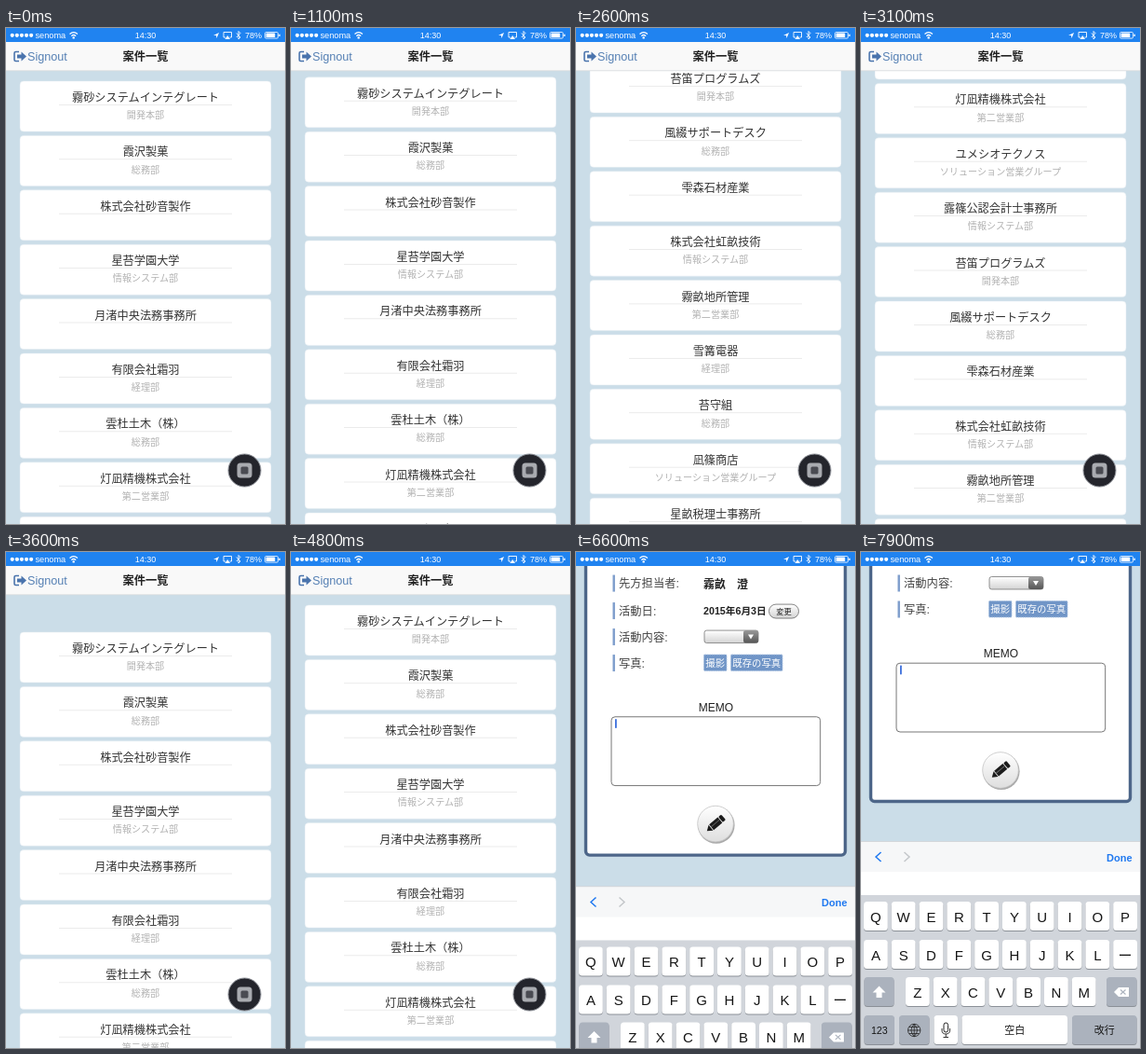
An HTML page that plays this animation: 300x532 px, repeating every 8 s.

```html
<!DOCTYPE html>
<html lang="ja">
<head>
<meta charset="utf-8">
<style>
html, body { margin: 0; width: 100%; height: 100%; overflow: hidden; background: #cbdde8; }
svg { display: block; width: 100vw; height: 100vh; font-family: "Liberation Sans", "Noto Sans CJK JP", "Noto Sans CJK", sans-serif; }
</style>
</head>
<body>
<svg id="stage" viewBox="0 0 300 532">
  <defs>
    <linearGradient id="pill" x2="0" y2="1"><stop stop-color="#fff"/><stop offset="1" stop-color="#d4d4d4"/></linearGradient>
    <linearGradient id="arrow" x2="0" y2="1"><stop stop-color="#999"/><stop offset="1" stop-color="#555"/></linearGradient>
    <linearGradient id="disc" x2="0" y2="1"><stop stop-color="#fff"/><stop offset="1" stop-color="#dedede"/></linearGradient>
  </defs>
  <rect width="300" height="532" fill="#cbdde8"/>
  <g id="listPage"><g id="cards"></g><g id="listTop"></g></g>
  <g id="formPage"></g>
  <g id="keyboard"></g>
  <g id="status"></g>
</svg>
<script>
const LOOP = 8000;
const $ = id => document.getElementById(id);
const rect = (x, y, w, h, fill, r = 0, more = '') =>
  `<rect x="${x}" y="${y}" width="${w}" height="${h}" rx="${r}" fill="${fill}" ${more}/>`;
const path = (d, stroke, width = 1, more = 'fill="none"') =>
  `<path d="${d}" stroke="${stroke}" stroke-width="${width}" ${more}/>`;
// y is the vertical middle of the glyphs
const text = (x, y, size, str, fill = '#333', more = '') =>
  `<text x="${x}" y="${y + size * .37}" font-size="${size}" fill="${fill}" ${more}>${str}</text>`;
const MID = 'text-anchor="middle"', BOLD = 'font-weight="bold"';

const clients = `霧砂システムインテグレート,開発本部
霞沢製菓,総務部
株式会社砂音製作,
星苔学園大学,情報システム部
月渚中央法務事務所,
有限会社霜羽,経理部
雲杜土木（株）,総務部
灯凪精機株式会社,第二営業部
ユメシオテクノス,ソリューション営業グループ
露篠公認会計士事務所,情報システム部
苔笛プログラムズ,開発本部
風綴サポートデスク,総務部
雫森石材産業,
株式会社虹畝技術,情報システム部
霧畝地所管理,第二営業部
雪篝電器,経理部
苔守組,総務部
凪篠商店,ソリューション営業グループ
星畝税理士事務所,経理部
雨笛物産,総務部`.split('\n').map(line => line.split(','));

const card = ([name, dept], i) => `<g transform="translate(0 ${i * 58.4})">` +
  rect(15, 57, 270, 54, '#fff', 4, 'stroke="#e3ebf0" stroke-width=".5"') +
  text(150, 74.5, 12.2, name, '#333', MID) +
  rect(57, 82, 186, .8, '#e6e6e6') +
  text(150, 93.5, 10.1, dept, '#b2b2b2', MID) + '</g>';

const header = (title, left) =>
  rect(0, 14, 300, 32, '#f9f9f9') + rect(0, 45.5, 300, .7, '#cfd4d8') +
  text(150, 30.5, 12.3, title, '#222', MID + ' ' + BOLD) + left;

const signout =
  path('M14 25.5H10.5Q9 25.5 9 27V34Q9 35.5 10.5 35.5H14', '#4a74ad', 1.6) +
  path('M12 28.5H16.5V25.5L22 30.5L16.5 35.5V32.5H12Z', 'none', 0, 'fill="#4a74ad"') +
  text(23, 30.5, 12.6, 'Signout', '#5680b4');

const stopButton =
  '<circle cx="256.5" cy="474.5" r="17.5" fill="#24252c" stroke="#8d9097" stroke-width="1"/>' +
  rect(248.5, 466.5, 16, 16, '#a9abb0', 3.5) + rect(252.5, 470.5, 8, 8, '#4a4b52', 1.5);

const fields = [['先方担当者:', 114], ['活動日:', 143.5], ['活動内容:', 171.5], ['写真:', 199.5]];
const blueButton = (x, w, label) =>
  rect(x, 190.5, w, 17.5, '#7095c7', 1, 'stroke="#a9c0df" stroke-dasharray="1.5 1"') +
  text(x + w / 2, 199.5, 10.4, label, '#fff', MID);

const form =
  rect(10.5, 57, 279, 348.5, '#fff', 4, 'stroke="#4d6689" stroke-width="3.4"') +
  text(150, 82, 12.2, clients[0][0], '#333', MID) +
  fields.map(([label, y]) => rect(39.5, y - 9, 2.4, 18, '#7c9ccb') + text(46, y, 12.3, label, '#444')).join('') +
  text(137, 114.5, 12, '霧畝　澄', '#222', BOLD) +
  text(137, 143.5, 10.7, '2015年6月3日', '#222', BOLD) +
  rect(207.5, 136.5, 32, 15, 'url(#pill)', 7.5, 'stroke="#666" stroke-width=".8"') +
  text(223.5, 144, 8.3, '変更', '#222', MID) +
  rect(138, 164.5, 58, 13.5, 'url(#pill)', 2.5, 'stroke="#777" stroke-width=".8"') +
  rect(180, 164.5, 16, 13.5, 'url(#arrow)', 2.5) +
  path('M185 169H191L188 174Z', 'none', 0, 'fill="#fff"') +
  blueButton(137.5, 24.5, '撮影') + blueButton(166.5, 55.5, '既存の写真') +
  text(150.5, 247, 12, 'MEMO', '#222', MID) +
  rect(38, 257.2, 224.7, 73.8, '#fff', 4, 'stroke="#777" stroke-width="1"') +
  rect(42, 259.5, 1.8, 10, '#3c6fdc', .8, 'id="caret"') +
  '<circle cx="150.8" cy="373.3" r="19.8" fill="#aaa"/>' +
  '<circle cx="150" cy="372" r="19.3" fill="url(#disc)" stroke="#c4c4c4" stroke-width=".8"/>' +
  '<g transform="translate(150 372) rotate(-40)" fill="#1c1c1c">' +
  '<path d="M-12 0L-6.5 -3.8V3.8Z"/>' + rect(-5.7, -3.8, 12, 7.6, '#1c1c1c') +
  rect(7.2, -3.8, 4, 7.6, '#1c1c1c', 1.2) + rect(-5.5, -.9, 11.5, .7, '#777') + '</g>' +
  header('案件情報', path('M14 25L9 30.5L14 36', '#4a74ad', 1.6) + text(18, 30.5, 12.3, '戻る', '#5680b4'));

const GREY = '#abb2bd';
const key = (x, y, w, label = '', fill = '#fff', size = 15) =>
  rect(x, y + 1, w, 31, '#8b9097', 3.5) + rect(x, y, w, 31, fill, 3.5) +
  text(x + w / 2, y + 16, size, label, '#151515', MID);
const keyRow = (letters, x, y) => [...letters].map((c, i) => key(x + i * 29.8, y, 25.8, c)).join('');

const keyboard =
  rect(0, 310, 300, 34, '#f6f7f8') + rect(0, 310, 300, .7, '#c5cace') +
  path('M21.5 322L16 327L21.5 332', '#2079f0', 1.5) +
  path('M46.5 322L52 327L46.5 332', '#c4c7ca', 1.5) +
  text(264, 327.5, 11, 'Done', '#2079f0', BOLD) +
  rect(0, 343, 300, 26, '#fff') + rect(0, 368, 300, 164, '#d1d5db') +
  keyRow('QWERTYUIOP', 3, 375) + keyRow('ASDFGHJKLー', 3, 416) + keyRow('ZXCVBNM', 48, 456) +
  key(3.5, 456, 32, '', GREY) + key(264, 456, 32.5, '', GREY) +
  path('M19.5 465.5L26.5 472.5H22.5V478H16.5V472.5H12.5Z', 'none', 0, 'fill="#fff"') +
  path('M272 472L277 467H288V477H277Z', 'none', 0, 'fill="#fff"') +
  path('M279 469.5L284.5 474.5M284.5 469.5L279 474.5', GREY, 1.1) +
  key(3.5, 497, 32.5, '123', GREY, 10.5) + key(41, 497, 32.5, '', GREY) + key(78.5, 497, 25.5) +
  key(108.5, 497, 113.5, '空白', '#fff', 11) + key(227, 497, 69.5, '改行', GREY, 11) +
  path('M50.5 513a6.7 6.7 0 1 0 13.4 0a6.7 6.7 0 1 0 -13.4 0H64M57.2 506.3V519.7M57.2 506.3q-6.5 6.7 0 13.4q6.5 -6.7 0 -13.4M52 509.5H62.4M52 516.5H62.4', '#222', .8) +
  rect(89, 505, 4.6, 10, 'none', 2.3, 'stroke="#222"') +
  path('M87 511V513Q87 517 91.3 517Q95.6 517 95.6 513V511M91.3 517V520.5M88.5 520.5H94', '#222', .9);

const status =
  rect(0, 0, 300, 15, '#2083f0') +
  [0, 1, 2, 3, 4].map(i => `<circle cx="${6.7 + i * 5.1}" cy="7.8" r="2.1" fill="#fff"/>`).join('') +
  text(31.5, 7.8, 9.2, 'senoma', '#fff') +
  path('M68.5 6.5Q72.7 2.8 77 6.5M70.3 8.6Q72.7 6.4 75.2 8.6', '#fff', 1.2) +
  '<circle cx="72.7" cy="10.4" r="1.2" fill="#fff"/>' +
  text(150, 7.8, 9, '14:30', '#fff', MID) +
  path('M223 8L229 5L226.5 11L226 8Z', 'none', 0, 'fill="#fff"') +
  path('M236 10H234V4.5H242.5V10H240.5', '#fff', .9) +
  path('M238.2 8L241 12H235.4Z', 'none', 0, 'fill="#fff"') +
  path('M247.8 5.5L252 10L250 12V3.5L252 5.5L247.8 10', '#fff', .9) +
  text(257, 7.8, 9, '78%', '#fff') +
  rect(278.5, 4.5, 14, 6.6, 'none', 1.2, 'stroke="#fff" stroke-width=".8"') +
  rect(279.6, 5.6, 9.6, 4.4, '#fff', .5) + rect(293.4, 6.5, 1.4, 2.6, '#fff', .6);

$('cards').innerHTML = clients.map(card).join('');
$('listTop').innerHTML = header('案件一覧', signout) + stopButton;
$('formPage').innerHTML = form;
$('keyboard').innerHTML = keyboard;
$('status').innerHTML = status;

// Scroll offset over time, joined by a monotone curve
const stops = [[1000, 0], [1800, 175], [2600, 604], [2850, 612], [3500, -24], [3600, -29], [4300, 0]];
const rate = i => (stops[i + 1][1] - stops[i][1]) / (stops[i + 1][0] - stops[i][0]);
const slopes = stops.map((_, i) => {
  if (!i || i === stops.length - 1) return 0;
  const a = rate(i - 1), b = rate(i);
  return a * b > 0 ? 2 * a * b / (a + b) : 0;
});
function scrollAt(t) {
  const i = stops.findIndex((s, n) => n < stops.length - 1 && t >= s[0] && t < stops[n + 1][0]);
  if (i < 0) return 0;
  const [t0, a] = stops[i], [t1, b] = stops[i + 1], d = t1 - t0, u = (t - t0) / d, v = 1 - u;
  return a * v * v * (1 + 2 * u) + b * u * u * (1 + 2 * v) + d * u * v * (v * slopes[i] - u * slopes[i + 1]);
}

const span = (t, start, length) => Math.min(1, Math.max(0, (t - start) / length));
const move = (id, x, y) => $(id).setAttribute('transform', `translate(${x} ${y})`);

function draw() {
  const t = performance.now() % LOOP;
  const slide = 1 - (1 - span(t, 4950, 450)) ** 3;
  const left = 1 - span(t, 6400, 500);
  move('cards', 0, -scrollAt(t));
  move('listPage', -300 * slide, 0);
  move('formPage', 300 * (1 - slide), -138 * (1 - left ** 1.7));
  move('keyboard', 0, 222 * left ** 2.96);
  $('caret').setAttribute('opacity', t > 6400 ? 1 : 0);
  requestAnimationFrame(draw);
}
draw();
</script>
</body>
</html>
```
